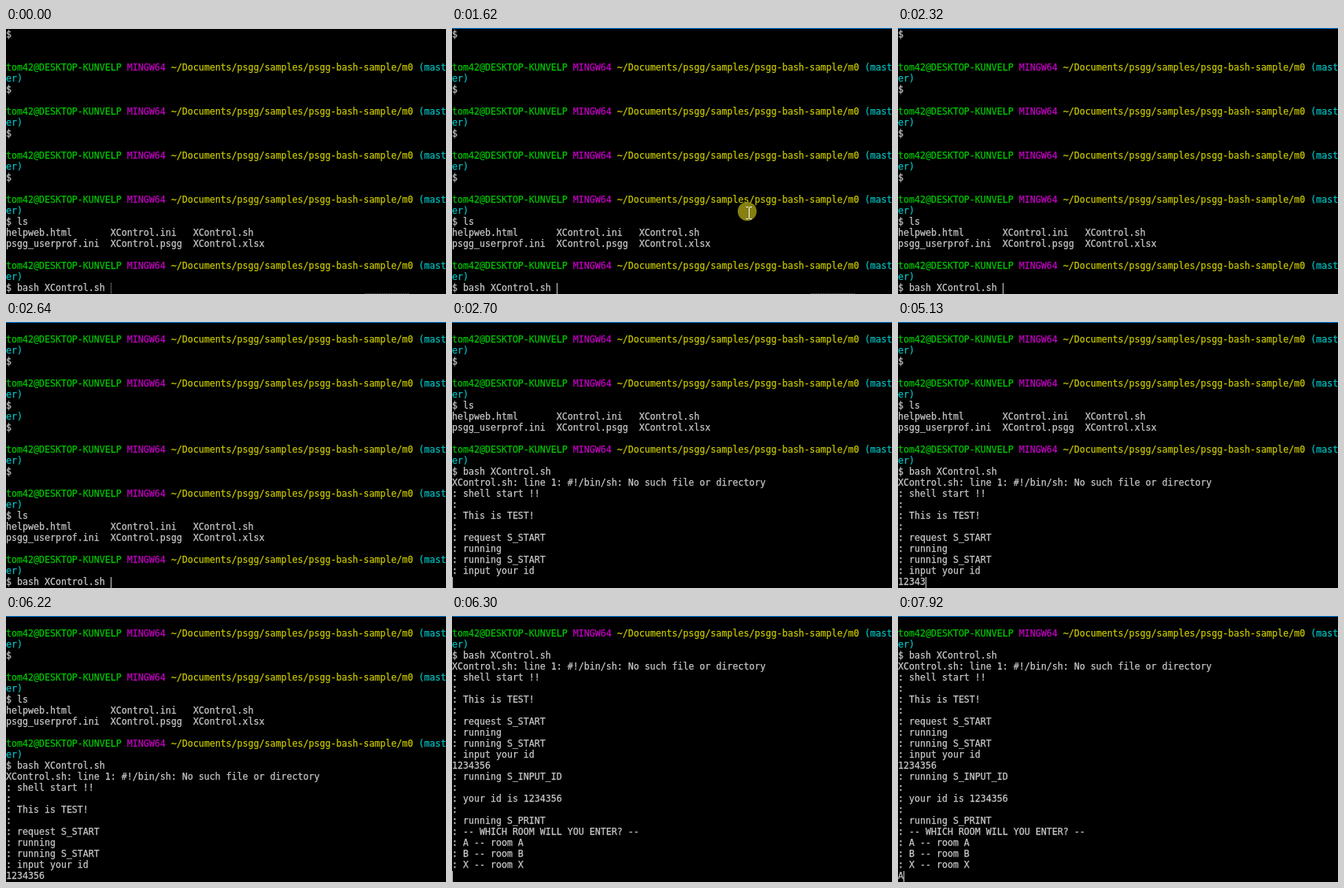
Write an HTML page that moves like this. It is 559 by 338 pixels and loops after 8000 ms.

```html
<!DOCTYPE html>
<html lang="en">
<head>
<meta charset="utf-8">
<title>Terminal session</title>
<style>
  html, body { margin: 0; width: 559px; height: 338px; overflow: hidden; background: #000; }
  #stage { position: relative; width: 559px; height: 338px; overflow: hidden; background: #000; }
  #stage > * { position: absolute; }
  #screen {
    left: 0; top: 1px; margin: 0; color: #c8c8c8; white-space: pre;
    font: 11.627px/14px "DejaVu Sans Mono", monospace;
    font-variant-ligatures: none;
    -webkit-text-stroke: .25px currentColor;
  }
  .user { color: #00c400; }
  .system { color: #c000c0; }
  .path { color: #c6c600; }
  .branch { color: #00c0c0; }
  #cursor { top: 324px; width: 1px; height: 14px; background: #d0d0d0; }
  #border { left: 0; top: 0; width: 559px; height: 1px; background: #0078d7; }
  #edge {
    left: 456px; top: 337px; width: 56px; height: 1px;
    background: repeating-linear-gradient(90deg, #3a423c 0 2px, #111 2px 3px);
  }
  #pointer { left: -12px; top: -12px; }
  .idle #cursor { background: repeating-linear-gradient(#bfbfbf 0 1px, #000 1px 2px); }
  .idle #border { background: #fff; }
</style>
</head>
<body>
<div id="stage">
  <pre id="screen"></pre>
  <div id="edge"></div>
  <div id="cursor"></div>
  <svg id="pointer" width="24" height="24" viewBox="0 0 24 24">
    <circle cx="12" cy="12" r="12" fill="#8f8a12" fill-opacity=".93"/>
    <path d="M10.5 6.5h3M15 6.5h3M14.5 7v14M10.5 21.5h3M15 21.5h3" fill="none" stroke="#fff"/>
  </svg>
  <div id="border"></div>
</div>
<script>
const LOOP = 8000, ROWS = 24, COL = 7;
const FOCUS = 1620, SETTLED = 1770;
const BLINK = 310, KEY_GAP = 250;
const $ = id => document.getElementById(id);
const span = (kind, text) => `<span class="${kind}">${text}</span>`;

const prompt = [
  [span("user", "tom42@DESKTOP-KUNVELP"), span("system", "MINGW64"),
   span("path", "~/Documents/psgg/samples/psgg-bash-sample/m0"), span("branch", "(mast")].join(" "),
  span("branch", "er)")
];
const emptyCommand = [...prompt, "$", ""];
const command = "$ bash XControl.sh ";

const session = [
  "$", "", "",
  ...emptyCommand, ...emptyCommand, ...emptyCommand,
  ...prompt, "$ ls",
  "helpweb.html       XControl.ini   XControl.sh",
  "psgg_userprof.ini  XControl.psgg  XControl.xlsx",
  "",
  ...prompt, command,
  "XControl.sh: line 1: #!/bin/sh: No such file or directory",
  ": shell start !!", ":", ": This is TEST!", ":",
  ": request S_START", ": running", ": running S_START", ": input your id",
  "1234356",
  ": running S_INPUT_ID", ":", ": your id is 1234356", ":",
  ": running S_PRINT", ": -- WHICH ROOM WILL YOU ENTER? --",
  ": A -- room A", ": B -- room B", ": X -- room X"
];

// top: first visible line; blink: when the cursor was last reset; torn: rows already scrolled
const scenes = [
  { start: 0, top: 0, blink: 1460, keyAt: 0, keys: [command] },
  { start: 2640, top: 2, blink: 2640, keyAt: 0, keys: [command], torn: 8 },
  { start: 2700, top: 10, blink: 2640, keyAt: 4370, keys: ["1", "2", "3", "43", "5", "6"] },
  { start: 6300, top: 20, blink: 6300, keyAt: 7920, keys: ["A"] }
];

const glides = [
  { start: 70, end: 370, from: [465, 323], to: [426, 261], power: 2 },
  { start: 1380, end: 1710, from: [409, 266], to: [375, 233], power: 6 }
];

const show = (el, on) => { el.style.visibility = on ? "visible" : "hidden"; };

function lines(scene, input) {
  const above = ROWS - 1;
  if (scene.torn) {
    return [...session.slice(scene.top, scene.top + scene.torn),
            ...session.slice(scene.torn, above), input];
  }
  return [...session.slice(scene.top, scene.top + above), input];
}

function drawPointer(t) {
  const glide = glides.find(g => t >= g.start && t < g.end);
  show($("pointer"), glide);
  if (!glide) return;
  const { start, end, from, to, power } = glide;
  const eased = 1 - (1 - (t - start) / (end - start)) ** power;
  const [x, y] = from.map((v, i) => Math.round(v + (to[i] - v) * eased));
  $("pointer").style.transform = `translate(${x}px, ${y}px)`;
}

let shown = "";
function draw(t) {
  const scene = scenes.findLast(s => t >= s.start);
  const pressed = Math.floor((t - scene.keyAt) / KEY_GAP) + 1;
  const count = Math.max(0, Math.min(pressed, scene.keys.length));
  const input = scene.keys.slice(0, count).join("");
  const html = lines(scene, input).join("\n");
  if (html !== shown) $("screen").innerHTML = shown = html;

  // Every key press restarts the blink.
  const lastKey = count ? scene.keyAt + (count - 1) * KEY_GAP : 0;
  const phase = t - Math.max(scene.blink, lastKey);
  const idle = t < FOCUS;
  $("stage").className = idle ? "idle" : "";
  $("cursor").style.left = input.length * COL + "px";
  show($("cursor"), idle || Math.floor(phase / BLINK) % 2 === 0);
  show($("edge"), t < SETTLED);
  drawPointer(t);
}

const begin = performance.now();
function tick() {
  draw((performance.now() - begin) % LOOP);
  requestAnimationFrame(tick);
}
draw(0);
requestAnimationFrame(tick);
</script>
</body>
</html>
```
